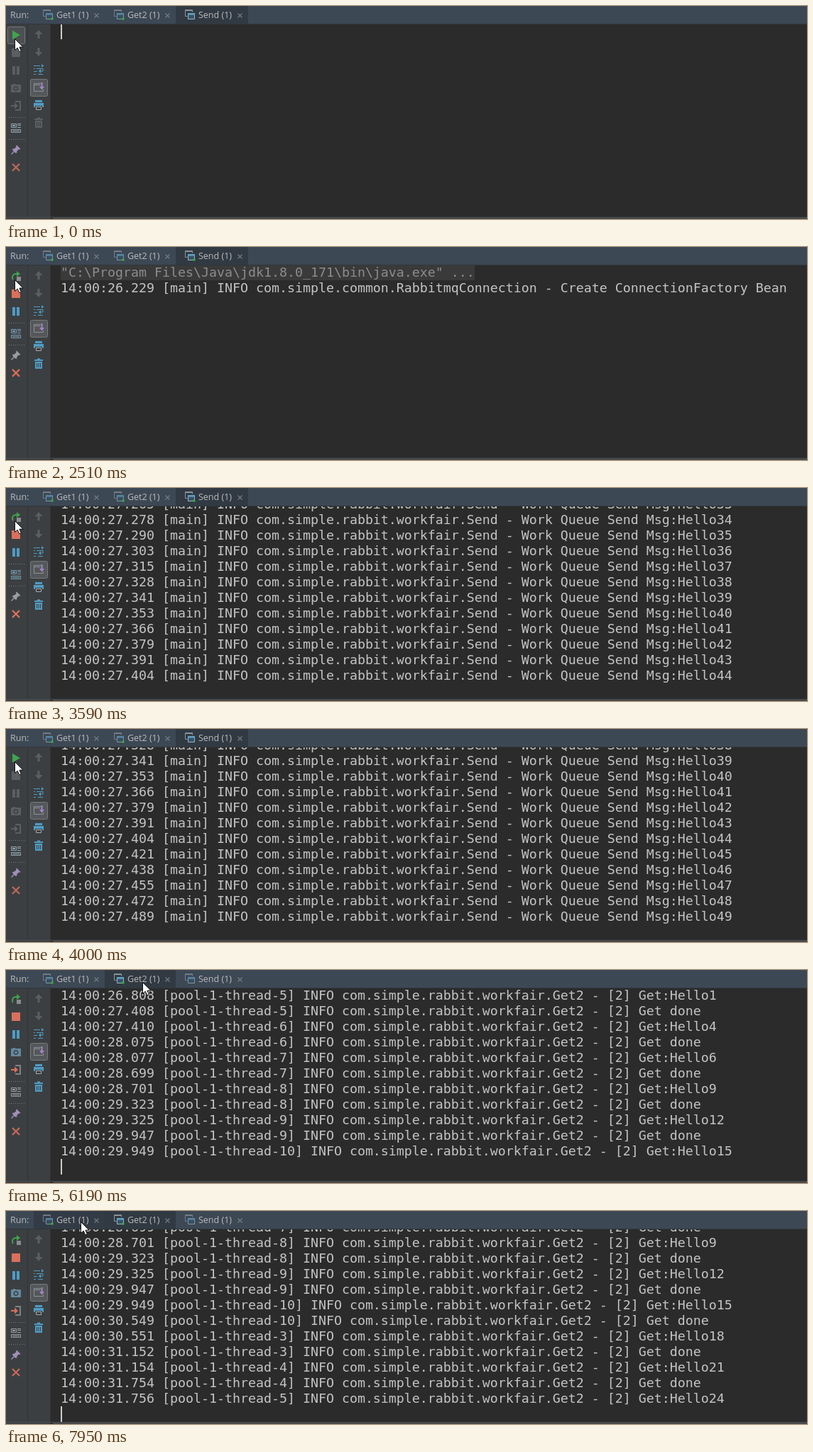
An HTML page that plays this animation: 1128 px wide and 301 px high, repeating every 8 s.

```html
<!DOCTYPE html>
<html lang="en">
<head>
<meta charset="utf-8">
<title>Run console</title>
<style>
html, body { margin: 0; width: 100%; height: 100%; overflow: hidden; background: #2b2b2b; }
svg { position: absolute; left: 0; top: 0; width: 1128px; height: 301px; }
.ui { font: 12.5px "Open Sans", "Noto Sans", sans-serif; fill: #bbb; }
.line { fill: none; stroke: currentColor; }
.fill { fill: currentColor; }
#view { position: absolute; left: 63px; top: 26px; width: 1065px; height: 272px; overflow: hidden; }
.log { position: absolute; left: 14px; top: -1px; white-space: pre; color: #c4c4c4;
  font: 18.27px/22px "DejaVu Sans Mono", monospace; }
.log div { height: 22px; width: max-content; }
.log .cmd { color: #8c8c8c; background: #3a3a3a; }
#caret { position: absolute; left: 14px; width: 2px; height: 22px; background: #ccc; }
</style>
</head>
<body>
<svg viewBox="0 0 1128 301">
  <defs>
    <g id="run"><path class="fill" d="M-5-6.5 6 0-5 6.5z"/></g>
    <g id="rerun">
      <path class="line" stroke-width="2" d="M-4 5A5 5 0 0 1-1-3H2"/>
      <path class="fill" d="M1-7 6-3 1 1z"/>
      <path d="M1 1h6v6H1z" fill="#8a8d8f"/>
    </g>
    <g id="stop"><path class="fill" d="M-6-6H6V6H-6z"/></g>
    <g id="pause"><path class="fill" d="M-5-6h4V6h-4zM1-6h4V6H1z"/></g>
    <g id="camera">
      <path class="fill" fill-rule="evenodd" d="M-7-5h3v-1h3v1h8V6H-7zM0-3a3.5 3.5 0 1 0 .01 0z"/>
      <circle class="fill" cy=".5" r="2"/>
    </g>
    <g id="exit">
      <path d="M-1-6H6V6H-1" fill="none" stroke="#7f8284" stroke-width="2"/>
      <path class="fill" d="M-7-1h5v-3.5L3 0l-5 4.5V1h-5z"/>
    </g>
    <g id="exitOff">
      <path class="line" stroke-width="2" d="M-1-6H6V6H-1"/>
      <path class="fill" d="M-7-1h5v-3.5L3 0l-5 4.5V1h-5z"/>
    </g>
    <g id="layout">
      <path class="line" d="M-6.5-5.5h7v5h-7zM-6.5 2.5h13v4h-13zM2-5.5h5M2-3.5h5M2-.5h5"/>
      <path class="fill" d="M-5-4h4v2h-4zM-5 4H5v1H-5z"/>
    </g>
    <g id="pin">
      <path class="fill" d="M1-6.5 6.5-1 5 0 4-.5 1.5 2 1 5-1 4.5-4.5 1-5-1-2-1.5.5-4 0-5z"/>
      <path class="line" stroke-width="1.4" d="M-2 2-6.5 6.5"/>
    </g>
    <g id="close"><path class="line" stroke-width="2.4" d="M-5-5 5 5M5-5-5 5"/></g>
    <g id="up"><path class="fill" d="M0-6 5.5 0H1.5V6h-3V0h-4z"/></g>
    <g id="down"><path class="fill" d="M0 6 5.5 0H1.5V-6h-3V0h-4z"/></g>
    <g id="wrap">
      <path class="line" d="M-7-5.5h9M4-5.5h3M-7-1.5h2M-3-1.5h9V2H1M-7 2.5h5M-7 6.5h3M-1 6.5h7"/>
      <path class="fill" d="M3-1 0 2l3 3zM4-8 7-5.5 4-3z"/>
    </g>
    <g id="end">
      <path d="M3-5.5h-9.5v11h13V3M-6.5-3.5H2" fill="none" stroke="#8f9294"/>
      <path class="fill" d="M3.5-7h2v6H8L4.5 3.5 1-1h2.5z"/>
    </g>
    <g id="print">
      <path class="fill" d="M-5-7H5v3H-5zM-7-3H7v6H5V1H-5v2h-2z"/>
      <path d="M-3.5 2.5h7v4h-7z" fill="none" stroke="#a9acae"/>
    </g>
    <g id="trash">
      <path class="fill" d="M-2-7.5h4v1.5h4v2H-6v-2h4zM-5-3H5V7H-5z"/>
      <path d="M-2.5-1v6M0-1v6M2.5-1v6" stroke="#3c3f41"/>
    </g>
    <g id="app">
      <path d="M3.5 9.5h-3v-9h10v3M0 1.5h11" fill="none" stroke="#8b959c"/>
      <path d="M4.5 5.5h9v8h-9z" fill="#35536a" stroke="#9fb3bf"/>
      <path d="M4 5h10v2.5H4z" fill="#62a5c4"/>
    </g>
  </defs>

  <path d="M66 298h1062v3H66z" fill="#46484a"/>
  <path d="M0 25h63v276H0z" fill="#3c3f41"/>
  <path d="M30.5 26v272M62.5 26v275" stroke="#323435"/>
  <path d="M0 298.5h66" stroke="#4a4d4f"/>
  <rect width="1128" height="25" fill="#3d4855"/>
  <path d="M0 25.5h1128" stroke="#323638"/>
  <g id="tabs" class="ui"><text x="6" y="17">Run:</text></g>
  <rect id="press" x="2.5" y="29.5" width="24" height="24" rx="2" stroke="#75787a"/>
  <g id="idle"></g>
  <g id="busy"></g>
  <g id="debug"></g>
  <rect x="34.5" y="103.5" width="24" height="24" rx="2" fill="#55585a" stroke="#77797b"/>
  <g id="side"></g>
</svg>
<div id="view">
  <div id="send" class="log"></div>
  <div id="get" class="log"></div>
  <div id="caret"></div>
</div>
<svg viewBox="0 0 1128 301">
  <path id="mouse" d="M.5.5v16l3.7-3.4 2.5 5.6 2.6-1.2-2.4-5.4h5z" fill="#fff" stroke="#111"/>
</svg>
<script>
const $ = id => document.getElementById(id);
const LOOP = 8000, ROW = 22, VIEW = 273;

function add(parent, tag, attrs, text) {
  const el = document.createElementNS("http://www.w3.org/2000/svg", tag);
  for (const k in attrs) el.setAttribute(k, attrs[k]);
  if (text) el.textContent = text;
  return parent.appendChild(el);
}
const icon = (parent, name, x, y, color) =>
  add(parent, "use", { href: "#" + name, x, y, color });
const show = (el, on) => { el.style.display = on ? "" : "none"; };
const last = (list, t) => list.findLastIndex(s => s[0] <= t);

// Values between key points [position, ...values]
const linear = p => p, smooth = p => p * p * (3 - 2 * p);
function track(keys, at, ease = linear) {
  const i = last(keys, at), [a, ...from] = keys[i], next = keys[i + 1];
  if (!next) return from;
  const p = ease((at - a) / (next[0] - a));
  return from.map((v, k) => Math.round(v + (next[k + 1] - v) * p));
}

// Toolbars
const GRAY = "#5c5f61", BLUE = "#4f9cc4", RED = "#d9705c", GREEN = "#3fa34d";
function toolbar(id, items, layout, pin, cross) {
  const g = $(id), sep = 32 + 25 * items.length;
  items.forEach(([name, color], i) => icon(g, name, 14, 41 + 25 * i, color));
  add(g, "path", { d: `M4 ${sep + .5}h23M4 ${sep + 31.5}h23`, stroke: "#777a7c", "stroke-dasharray": "1 2" });
  icon(g, "layout", 14, sep + 15, layout);
  icon(g, "pin", 14, sep + 46, pin);
  icon(g, "close", 14, sep + 71, cross);
}
toolbar("idle", [["run", GREEN], ["stop", GRAY], ["pause", GRAY], ["camera", GRAY], ["exitOff", GRAY]],
  "#93a7b3", "#a08fb8", "#b9685a");
toolbar("busy", [["rerun", GREEN], ["stop", RED], ["pause", BLUE]], "#7ba0b5", "#9a9da0", RED);
toolbar("debug", [["rerun", GREEN], ["stop", RED], ["pause", BLUE], ["camera", "#64899e"], ["exit", RED]],
  "#9a9da0", "#a08fb8", "#c2685a");
[["up", GRAY], ["down", GRAY], ["wrap", BLUE], ["end", "#a584c9"], ["print", BLUE]]
  .forEach(([name, color], i) => icon($("side"), name, 46, 40 + 25 * i, color));
const trash = icon($("side"), "trash", 46, 165, GRAY);

// Tabs
const tabs = ["Get1 (1)", "Get2 (1)", "Send (1)"].map((label, i) => {
  const g = $("tabs"), x = 39 + 100 * i, w = i < 2 ? 100 : 102;
  const back = add(g, "rect", { x, y: 0, width: w, height: 25, fill: "#313a43" });
  const art = icon(g, "app", x + 13, 5);
  const dot = add(g, "circle", { cx: x + 26, cy: 18, r: 1.7, fill: "#35b435" });
  add(g, "text", { x: x + 32, y: 17 }, label);
  add(g, "path", { d: `M${x + w - 14.5} 10.5l6 6m0-6l-6 6`, stroke: "#727b84", "stroke-width": 1.2 });
  return { back, art, dot };
});

// Console text; log clocks are in ms after 14:00
const stamp = ms => "14:00:" + (ms / 1000).toFixed(3);
const sendClock = [[0, 26795], [13, 26938], [20, 27105], [24, 27151], [44, 27404], [49, 27489]];
const getClock = [[0, 26808], [1, 27410], [2, 28077], [5, 29949], [8, 31756], [9, 32358]];

const sendLines = [
  '"C:\\Program Files\\Java\\jdk1.8.0_171\\bin\\java.exe" ...',
  "14:00:26.229 [main] INFO com.simple.common.RabbitmqConnection - Create ConnectionFactory Bean"];
for (let i = 0; i < 50; i++)
  sendLines.push(`${stamp(track(sendClock, i)[0])} [main] INFO com.simple.rabbit.workfair.Send - Work Queue Send Msg:Hello${i}`);
sendLines.push("", "Process finished with exit code 0");

const getLines = [];
for (let i = 0; i < 9; i++) {
  const thread = 3 + (i + 2) % 8, msg = 3 * i + (i < 2 ? 1 : 0);
  const row = (ms, text) =>
    getLines.push(`${stamp(ms)} [pool-1-thread-${thread}] INFO com.simple.rabbit.workfair.Get2 - [2] Get${text}`);
  row(track(getClock, i)[0], ":Hello" + msg);
  row(track(getClock, i + 1)[0] - 2, " done");
}

function write(log, lines) {
  return lines.map(text => {
    const row = log.appendChild(document.createElement("div"));
    row.textContent = text;
    return row;
  });
}
const sendRows = write($("send"), sendLines);
const getRows = write($("get"), getLines);
sendRows[0].className = "cmd";

// Bursts of output: time, rows written so far
const sendBursts = [[0, 0], [890, 1], [2510, 2], [3090, 14], [3260, 27], [3500, 47], [3670, 52], [4200, 54]];
const getBursts = [[0, 7], [5530, 8], [5580, 9], [6190, 11], [6780, 13], [7390, 15], [7850, 17]];
const bottom = rows => Math.max(0, (rows + 1) * ROW - VIEW);

// Each burst scrolls to the end, easing out in 45 ms ticks
function scroll(log, rows, bursts, t) {
  const i = last(bursts, t), [start, count] = bursts[i];
  const from = i ? bottom(bursts[i - 1][1]) : bottom(count);
  const p = Math.min(1, Math.floor((t - start) / 45) * 45 / 85);
  const top = Math.round(from + (bottom(count) - from) * (1 - (1 - p) ** 3));
  log.style.transform = `translateY(${-top}px)`;
  rows.forEach((row, k) => show(row, k < count));
  return count * ROW - top;
}

const path = [[0, 12, 46], [4660, 12, 46], [5020, 196, 20], [5120, 196, 20], [5450, 192, 17],
  [7210, 192, 17], [7950, 105, 15]];
const CLICK = 5270;

function render(t) {
  const onGet = t >= CLICK;
  const running = t >= 890 && t < 4000;
  const [mx, my] = track(path, t, smooth);

  show($("send"), !onGet);
  show($("get"), onGet);
  const sendEnd = scroll($("send"), sendRows, sendBursts, t);
  const getEnd = scroll($("get"), getRows, getBursts, t);
  show($("caret"), t < 690 || onGet);
  $("caret").style.top = (onGet ? getEnd : sendEnd) - 1 + "px";

  show($("idle"), !onGet && !running);
  show($("busy"), running);
  show($("debug"), onGet);
  show($("press"), t < 510);
  $("press").setAttribute("fill", t >= 100 && t < 330 ? "#5c6164" : "#4c5052");
  trash.setAttribute("color", t < 890 ? GRAY : BLUE);

  const selected = onGet ? 1 : 2;
  tabs.forEach((tab, i) => {
    const x = 39 + 100 * i;
    const hover = my < 25 && mx >= x && mx < x + 100;
    show(tab.back, i == selected || hover);
    tab.back.setAttribute("opacity", i == selected ? 1 : .8);
    tab.art.setAttribute("opacity", i == selected ? 1 : .7);
    show(tab.dot, i < 2 || running);
  });
  $("mouse").setAttribute("transform", `translate(${mx} ${my})`);
}

const begin = performance.now();
function tick() {
  render((performance.now() - begin) % LOOP);
  requestAnimationFrame(tick);
}
tick();
</script>
</body>
</html>
```
